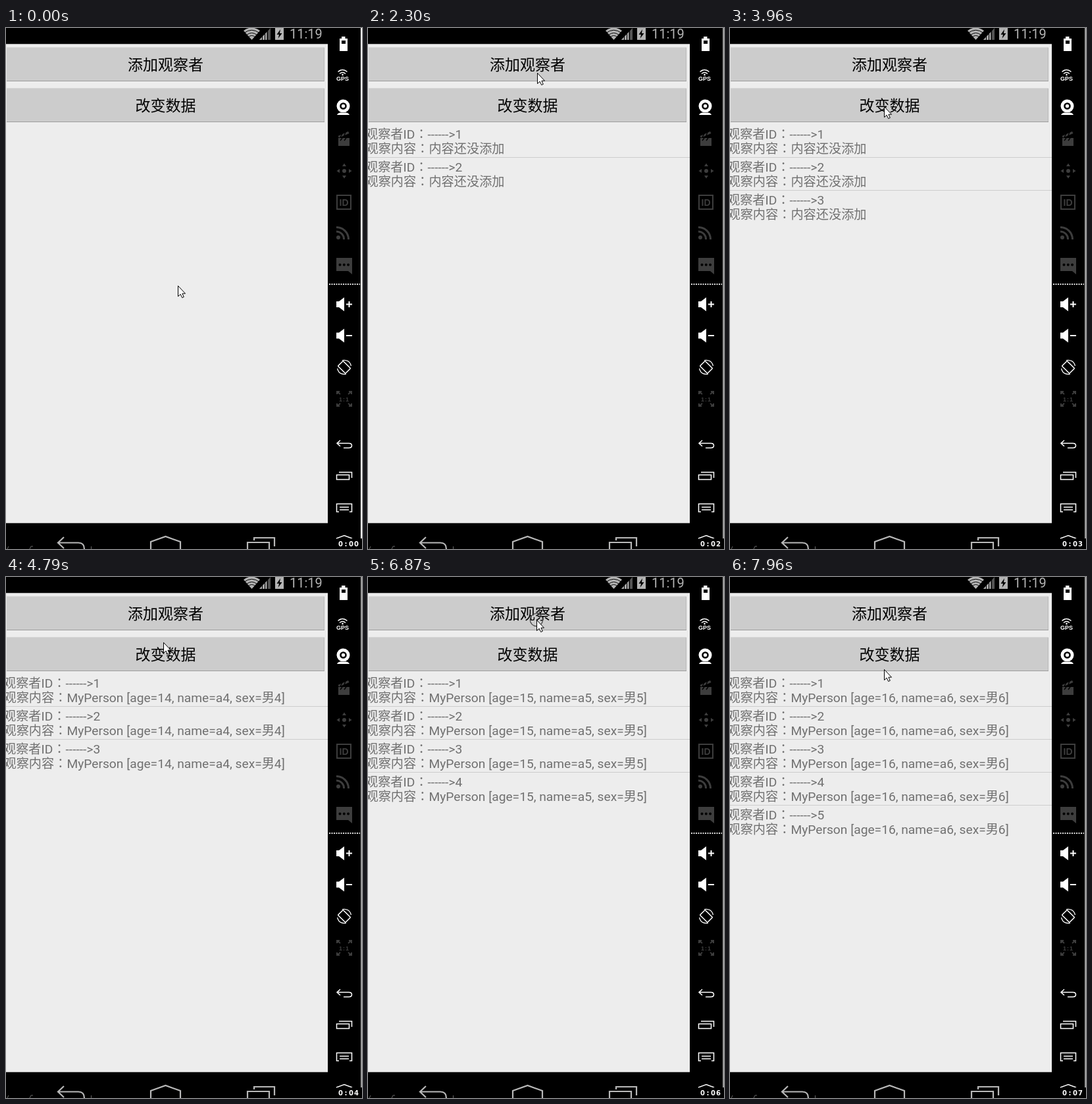
An HTML page that plays this animation: 541x791 px, repeating every 8 s.

```html
<!DOCTYPE html>
<html>
<head>
<meta charset="utf-8">
<style>
html, body { margin: 0; width: 100%; height: 100%; overflow: hidden; background: #000; }
svg { display: block; width: 541px; height: 791px; }
text { font-family: Roboto, 'Noto Sans CJK SC', 'Noto Sans CJK', sans-serif; }
.label { font-size: 23px; text-anchor: middle; }
.row { font-size: 19.2px; fill: #707070; }
.colon { font-family: 'Noto Sans CJK JP', 'Noto Sans CJK', sans-serif; -webkit-locale: 'ja'; }
.line { fill: none; stroke: #fff; stroke-width: 1.5; }
.nav { fill: none; stroke: #b8b8b8; stroke-width: 2.2; }
.dim { fill: #3d3d3d; }
.dimline { fill: none; stroke: #3d3d3d; stroke-width: 2; }
.bold { font-family: 'Liberation Sans', sans-serif; font-weight: bold; text-anchor: middle; }
.timer { font: bold 10px 'DejaVu Sans', sans-serif; fill: #fff; }
</style>
</head>
<body>
<svg viewBox="0 0 541 791">
  <rect width="541" height="791"/>
  <rect y="24" width="489" height="728" fill="#ededed"/>
  <path d="M0 24.5H489M0 751.5H489" stroke="#a8a8a8"/>

  <!-- status bar -->
  <g fill="#b4b4b4">
    <path d="M361 4Q373-5 386 4L373.500 18z"/>
    <path d="M362 7.500Q373.500-1 385 7.500M365 11Q373.500 4 382 11M368 14Q373.500 9 379 14" fill="none" stroke="#000"/>
    <path d="M385 18L402 0V18z" fill="#555"/>
    <path d="M385 18L396 6.500V18z" fill="#aaa"/>
    <path d="M389.500 10V18M393.500 8V18M397.500 4V18" stroke="#000"/>
    <path d="M409 0H422V18H409z"/>
    <path d="M417 2L411.500 10H415L413.500 16L419.500 8H416z" fill="#000"/>
    <text x="431" y="16" font-size="20">11:19</text>
  </g>

  <g id="buttons"></g>
  <g id="rows"></g>

  <!-- navigation bar -->
  <g class="nav">
    <path d="M88 773L79 781.500L88 790M79 781.500H110Q119 781.500 119 791"/>
    <path d="M220 792V780L242.500 772L265 780V792"/>
    <path d="M367 792V781H400V792M377 778V774H408V787"/>
  </g>
  <path d="M2 791L4 787M36 791L38 787H41M129.500 787V791" fill="none" stroke="#666"/>

  <!-- side toolbar -->
  <rect id="edge" x="539" width="2" height="775"/>
  <g fill="#fff">
    <path d="M510 13H515.500V16H519V35H507V16H510zM510 19V24H516V19z" fill-rule="evenodd"/>
    <path class="line" d="M504.500 66.500Q511.500 60.500 518.500 66.500M507 69.500Q511.500 65.500 516 69.500"/>
    <circle cx="511.500" cy="71" r="1.300"/>
    <text class="bold" x="511.500" y="80" font-size="9">GPS</text>
    <circle cx="512.500" cy="118.500" r="10"/>
    <circle cx="512.500" cy="118.500" r="4" fill="none" stroke="#000" stroke-width="2.600"/>
    <path d="M503 132Q505 127 512.500 129Q520 127 522 132z"/>
    <path id="speaker" d="M502 415H506L514 409V430L506 424H502z"/>
    <use href="#speaker" y="47.500"/>
    <path d="M517 419.500H526M521.500 415V424M517 467H526" stroke="#fff" stroke-width="2"/>
  </g>
  <g class="dim">
    <path d="M505 167H522V179H505zM504.500 164L520 157L521.500 160L506 166.500z"/>
    <path d="M508 166L511 160M514 163.500L516 158M508 171L511 167M514 171L517 167" stroke="#000" stroke-width="1.400"/>
    <circle cx="514" cy="217" r="3"/>
    <path d="M514 205.500L517 210H511zM514 228.500L517 224H511zM502.500 217L507 214V220zM525.500 217L521 214V220z"/>
    <path class="dimline" d="M503 254H524V275H503z"/>
    <text class="bold" x="513.500" y="270" font-size="14">ID</text>
    <circle cx="505" cy="318" r="3"/>
    <path class="dimline" style="stroke-width:3" d="M502 309A11.500 11.500 0 0 1 513.500 321M502 302.500A18.500 18.500 0 0 1 520.500 321"/>
    <path d="M502 349H526V374L520 369H502z"/>
    <path d="M507.500 359.500H523" stroke="#000" stroke-width="4" stroke-linecap="round" stroke-dasharray="0 6.300"/>
    <path class="dimline" d="M503 556V552H507M503 552L508 556M521 552H525V556M525 552L520 556M503 570V574H507M503 574L508 570M521 574H525V570M525 574L520 570"/>
    <text class="bold" x="514" y="566.500" font-size="9" letter-spacing="1">1:1</text>
  </g>
  <path d="M491 389H538" stroke="#ddd" stroke-width="2" stroke-dasharray="2 1.500"/>
  <g class="line">
    <rect x="508.500" y="507" width="11" height="16" rx="1" transform="rotate(-45 514 515)"/>
    <path d="M511 504.500Q522 503 524.500 513M503.500 517Q506 527 517 525.500" stroke-width="1.200"/>
    <path d="M508 626L503 630.500L508 635M503 630.500H521Q525.500 630.500 525.500 634Q525.500 637.500 521 637.500H513"/>
    <path d="M502.500 678.500H521.500V685.500H502.500zM506 674.500H525.500V683"/>
    <path d="M506 734.500H502.500V722.500H525.500V734.500H522M507 727.500H521M507 731.500H521"/>
    <path d="M502 775L514 770.500L526 775"/>
  </g>
  <rect x="503" y="775" width="38" height="16"/>
  <text id="timer" class="timer" x="505 514.500 521 529" y="786.500"></text>

  <g id="pointer">
    <circle id="ring" r="9.700" fill="none" stroke="#444" stroke-width="1.200"/>
    <path d="M.5.5V16.500L4.200 13.200L6.700 18.500L9.300 17.300L6.900 12.200H11.500z" fill="#fff" stroke="#000"/>
  </g>
</svg>
<script>
const $ = id => document.getElementById(id);
const LOOP = 8000, EMPTY = '内容还没添加';

// Each entry: start time and the properties that change then.
const timeline = [
  [0, { at: [261, 391], ring: false, pressed: 0, rows: 0, data: 0, filled: 0, sec: 0 }],
  [520, { at: [261, 272] }],
  [670, { at: [261, 130] }],
  [820, { at: [256, 79] }],
  [970, { at: [257, 68] }],
  [1080, { sec: 1 }],
  [1190, { ring: true }],
  [1340, { ring: false, rows: 1 }],
  [2020, { sec: 2 }],
  [2170, { pressed: 1 }],
  [2300, { pressed: 0, rows: 2 }],
  [3040, { sec: 3 }],
  [3150, { ring: true }],
  [3270, { ring: false, pressed: 1 }],
  [3410, { pressed: 0, rows: 3 }],
  [3690, { at: [243, 104] }],
  [3840, { at: [237, 115] }],
  [3960, { at: [234, 119] }],
  [4110, { ring: true, sec: 4 }],
  [4220, { ring: false, pressed: 2 }],
  [4330, { pressed: 0, data: 4, filled: 3 }],
  [4790, { at: [239, 99] }],
  [4910, { at: [247, 75] }],
  [5030, { at: [253, 57], ring: true }],
  [5180, { ring: false, pressed: 1, sec: 5 }],
  [5280, { pressed: 0, rows: 4 }],
  [5680, { at: [251, 75] }],
  [5800, { at: [248, 93] }],
  [5920, { at: [246, 105] }],
  [6070, { ring: true, sec: 6 }],
  [6180, { ring: false, pressed: 2 }],
  [6300, { pressed: 0, data: 5, filled: 4 }],
  [6570, { at: [250, 85] }],
  [6720, { at: [253, 67] }],
  [6870, { at: [256, 65], ring: true }],
  [7020, { ring: false, pressed: 1 }],
  [7170, { pressed: 0, rows: 5, at: [252, 78] }],
  [7320, { at: [243, 101], sec: 7 }],
  [7430, { at: [237, 126] }],
  [7540, { at: [234, 140] }],
  [7690, { ring: true }],
  [7810, { ring: false, pressed: 2 }],
  [7960, { pressed: 0, data: 6, filled: 5 }]
];

$('buttons').innerHTML = ['添加观察者', '改变数据'].map((label, i) => `
  <g transform="translate(0 ${i * 62})">
    <rect class="face" x="1" y="29" width="483" height="52"/>
    <path d="M1 29.500H484" stroke="#d8d8d8"/>
    <path d="M1 80.500H484" stroke="#9c9c9c"/>
    <path d="M483.500 30V80" stroke="#b8b8b8"/>
    <text class="label" x="242.500" y="64">${label}</text>
  </g>`).join('');

const colon = '<tspan class="colon" xml:lang="ja">：</tspan>';
$('rows').innerHTML = [1, 2, 3, 4, 5].map(n => `
  <g class="row" transform="translate(0 ${(n - 1) * 50})">
    ${n > 1 ? '<path d="M0 146.500H489" stroke="#cdcdcd"/>' : ''}
    <text x="-4" y="168">观察者ID${colon}------&gt;${n}</text>
    <text x="-3.500" y="190">观察内容${colon}<tspan class="value"></tspan></text>
  </g>`).join('');

const faces = [...document.querySelectorAll('.face')];
const rows = [...document.querySelectorAll('.row')];
const values = [...document.querySelectorAll('.value')];
const show = (el, on) => el.setAttribute('visibility', on ? 'visible' : 'hidden');

function render(t) {
  const s = Object.assign({}, ...timeline.filter(([start]) => start <= t).map(([, change]) => change));
  const person = `MyPerson [age=1${s.data}, name=a${s.data}, sex=男${s.data}]`;
  faces.forEach((face, i) => face.setAttribute('fill', s.pressed === i + 1 ? '#b5b5b5' : '#cccccc'));
  rows.forEach((row, i) => {
    show(row, i < s.rows);
    values[i].textContent = i < s.filled ? person : EMPTY;
  });
  $('pointer').setAttribute('transform', `translate(${s.at})`);
  show($('ring'), s.ring);
  $('edge').setAttribute('fill', s.sec > 0 ? '#999' : '#fff');
  $('timer').textContent = `0:0${s.sec}`;
}

function tick() {
  render(performance.now() % LOOP);
  requestAnimationFrame(tick);
}
tick();
</script>
</body>
</html>
```
